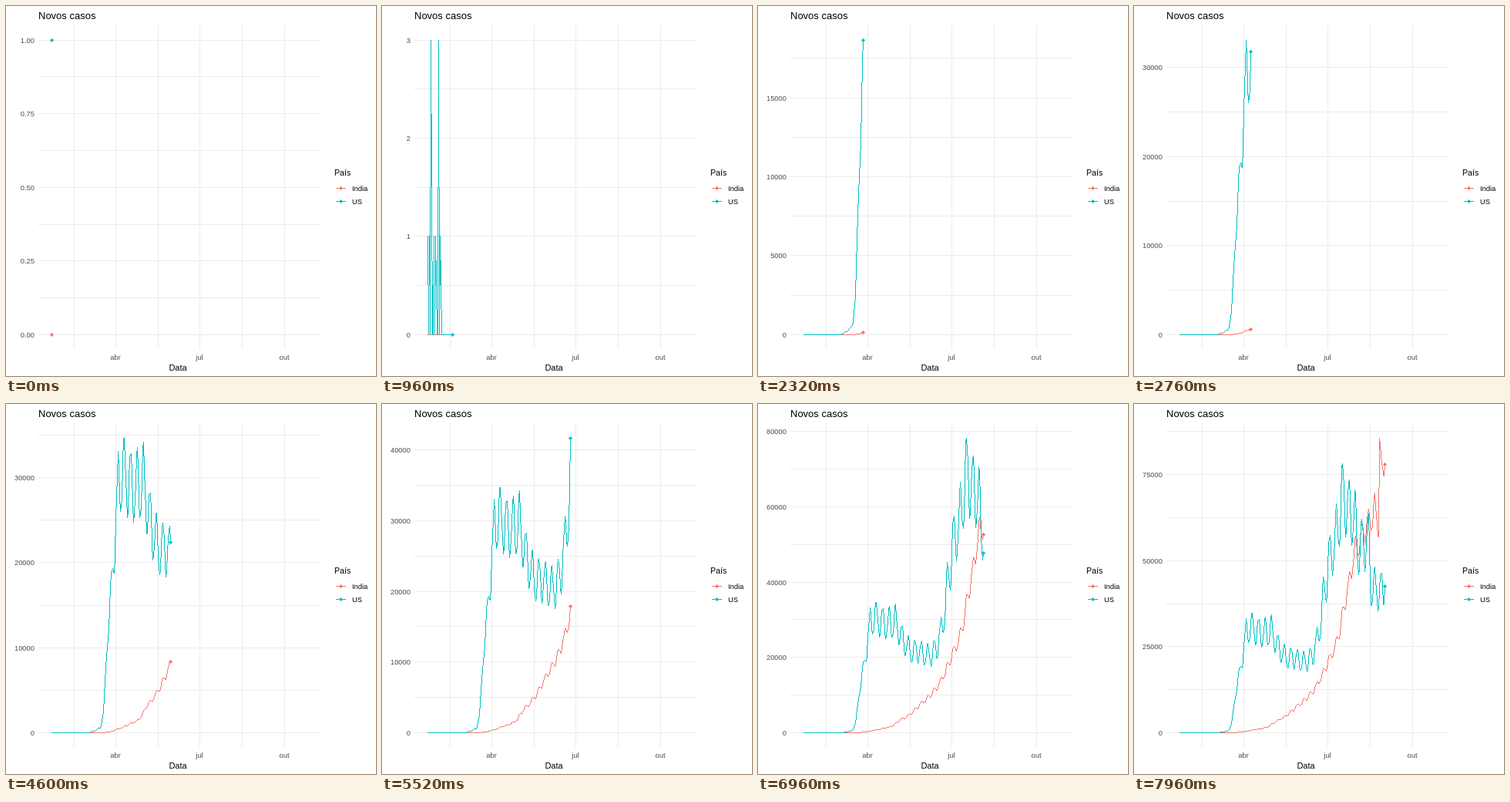
Write an HTML page with a canvas that moves like this. It is 480 px wide and 480 px high and loops after 8000 ms.

```html
<!DOCTYPE html>
<html lang="pt">
<head>
<meta charset="utf-8">
<title>Novos casos</title>
<style>
  html, body { margin: 0; width: 100%; height: 100%; overflow: hidden; background: #fff; }
  canvas { display: block; }
</style>
</head>
<body>
<canvas id="chart" width="480" height="480"></canvas>
<script>
const ctx = document.getElementById('chart').getContext('2d');

const LOOP = 8000, FRAME = 40;
const DAYS_PER_FRAME = 279 / 249, LAST_DAY = 223;
const PANEL = { left: 42, right: 409, top: 25, bottom: 445 };
const GRID = '#ebebeb', AXIS_TEXT = '#4d4d4d';

// trend: key points [day, mean daily cases]; weekly: size of the weekly swing.
const countries = [
  {
    name: 'India', color: '#f8766d', legendY: 236, weekly: 0.07, firstCases: 0,
    trend: [
      [40, 2], [55, 15], [62, 80], [70, 350], [80, 800], [95, 1600], [103, 3100],
      [118, 5400], [129, 8100], [143, 11300], [159, 19300], [169, 25100], [180, 38500],
      [190, 53000], [201, 58500], [212, 65300], [216, 60000], [217, 85400],
      [219, 73000], [223, 82300]
    ]
  },
  {
    name: 'US', color: '#00bfc4', legendY: 253, weekly: 0.15, firstCases: 7,
    trend: [
      [38, 7], [45, 157], [53, 600], [57, 3900], [61, 13000], [65, 16300], [67, 20400],
      [72, 28900], [77, 31500], [79, 30300], [86, 28700], [100, 29900], [106, 25000],
      [117, 21700], [128, 21200], [138, 20500], [144, 22000], [151, 29000], [156, 39600],
      [162, 49200], [169, 56500], [176, 69000], [184, 64200], [190, 63000], [194, 53500],
      [205, 55500], [208, 43000], [221, 40000], [223, 47900]
    ]
  }
];

// Exponential growth or decay between key points.
function trendAt(trend, day) {
  const next = Math.max(1, trend.findIndex(([d]) => d >= day));
  const [d0, v0] = trend[next - 1], [d1, v1] = trend[next];
  return v0 * (v1 / v0) ** ((day - d0) / (d1 - d0));
}

// Reports peak on Fridays and dip on Mondays.
const weekWave = day => Math.cos((day - 1.7) * 2 * Math.PI / 7);

function dailyCases({ trend, weekly, firstCases }) {
  const cases = Array(LAST_DAY + 1).fill(0);
  for (let k = 0; k < firstCases; k++) cases[Math.floor(k * 2.4)] = k % 3 === 2 ? 3 : 1;
  for (let day = trend[0][0]; day <= LAST_DAY; day++)
    cases[day] = Math.round(trendAt(trend, day) * (1 + weekly * weekWave(day)));
  return cases;
}
for (const c of countries) c.cases = dailyCases(c);

const xOf = day => Math.round(58.7 + day * 333.6 / 279);

// Tick step that best balances round numbers, coverage and density (about 5 ticks).
function tickStep(lo, hi) {
  const range = hi - lo, decade = Math.floor(Math.log10(range));
  let best = -Infinity, bestStep = range;
  [1, 5, 2, 2.5, 4, 3].forEach((q, rank) => {
    for (let k = 2; k <= 12; k++) for (let z = decade - 2; z <= decade; z++) {
      const step = q * 10 ** z;
      const lastStart = Math.ceil(lo / step);
      for (let s = Math.floor(hi / step) - k + 1; s <= lastStart; s++) {
        const first = s * step, last = first + step * (k - 1);
        const simplicity = (first <= 0 && last >= 0 ? 1 : 0) - rank / 5;
        const coverage = 1 - 0.5 * ((hi - last) ** 2 + (lo - first) ** 2) / (0.1 * range) ** 2;
        const ratio = (Math.max(last, hi) - Math.min(first, lo)) / step / 4;
        const density = 2 - Math.max(ratio, 1 / ratio);
        const score = 0.25 * simplicity + 0.2 * coverage + 0.5 * density;
        if (score > best + 1e-9) { best = score; bestStep = step; }
      }
    }
  });
  return bestStep;
}

function text(str, x, y, size, color = '#000', align = 'left') {
  ctx.font = `${size}px "Liberation Sans", Arial, sans-serif`;
  ctx.fillStyle = color;
  ctx.textAlign = align;
  ctx.fillText(str, x, y);
}

function rect(color, x, y, w, h) {
  ctx.fillStyle = color;
  ctx.fillRect(x, y, w, h);
}

const gridColumn = x => rect(GRID, x, PANEL.top, 1, PANEL.bottom - PANEL.top);
const gridRow = y => rect(GRID, PANEL.left, y, PANEL.right - PANEL.left, 1);

function dot(color, x, y) {
  rect(color, x - 1, y - 1, 3, 3);
  rect(color, x - 2, y, 5, 1);
  rect(color, x, y - 2, 1, 5);
}

// Hard-edged line, drawn as one vertical run per pixel column.
function segment(color, x0, y0, x1, y1) {
  const dx = x1 - x0;
  const yAt = f => Math.round(y0 + (y1 - y0) * Math.min(1, Math.max(0, f)));
  for (let i = 0; i <= dx; i++) {
    const a = yAt((i - 0.5) / dx), b = yAt((i + 0.5) / dx);
    rect(color, x0 + i, Math.min(a, b), 1, Math.max(1, Math.abs(b - a)));
  }
}

function drawLabels() {
  text('Novos casos', 42, 17, 13);
  text('Data', 223, 473, 11, '#000', 'center');
  text('País', 426, 220, 10.6);
  for (const { name, color, legendY } of countries) {
    rect(color, 428, legendY, 13, 1);
    dot(color, 434, legendY);
    text(name, 449, legendY + 4, 9.4);
  }
}

function drawAxes(max, yOf) {
  const lo = -0.05 * max, hi = 1.05 * max, step = tickStep(lo, hi);
  const decimals = [0, 1, 2].find(d => Math.abs(step * 10 ** d % 1) < 1e-6);
  [88, 142, 197, 251, 306, 361].forEach(gridColumn);
  [['abr', 142], ['jul', 251], ['out', 361]].forEach(([month, x]) =>
    text(month, x, 459, 9.4, AXIS_TEXT, 'center'));
  for (let half = 0; half * step / 2 <= hi; half++) {
    const value = half * step / 2, y = yOf(value);
    gridRow(y);
    if (half % 2 === 0) text(value.toFixed(decimals), 37, y + 4, 9.4, AXIS_TEXT, 'right');
  }
}

function draw(frame) {
  const today = Math.round(frame * DAYS_PER_FRAME);
  const max = Math.max(...countries.flatMap(c => c.cases.slice(0, today + 1)));
  const yOf = value => Math.floor(426.4 - 382.3 * value / max);

  rect('#fff', 0, 0, 480, 480);
  drawLabels();
  drawAxes(max, yOf);
  for (const { color, cases } of countries)
    for (let d = 1; d <= today; d++)
      segment(color, xOf(d - 1), yOf(cases[d - 1]), xOf(d), yOf(cases[d]));
  for (const { color, cases } of countries) dot(color, xOf(today), yOf(cases[today]));
}

let shown = -1;
function tick() {
  const frame = Math.floor(performance.now() % LOOP / FRAME);
  if (frame !== shown) draw(shown = frame);
  requestAnimationFrame(tick);
}
tick();
</script>
</body>
</html>
```
